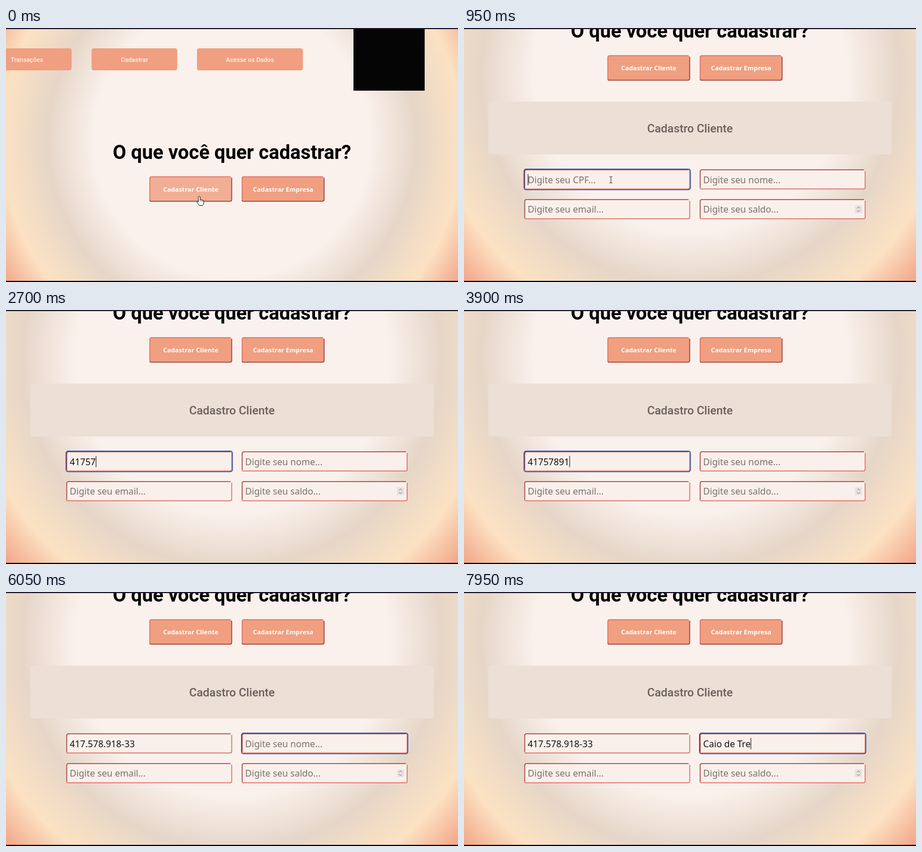
An HTML page that plays this animation: 800x450 px, repeating every 8000 ms.

```html
<!DOCTYPE html>
<html lang="pt-BR">
<head>
<meta charset="utf-8">
<title>Cadastro</title>
<style>
  html, body { margin: 0; width: 100%; height: 100%; overflow: hidden; background: #000; }
  svg { display: block; width: 100vw; height: 100vh; }
  text { font-family: "Noto Sans", sans-serif; white-space: pre; }
  .title, .nav, .legend { font-family: Roboto, sans-serif; text-anchor: middle; }
  .title { font-size: 34.4px; font-weight: 600; }
  .nav { font-size: 11px; font-weight: 500; fill: #fdf1ea; }
  .legend { font-size: 20.4px; font-weight: 500; fill: #685f5c; }
  .button { font-size: 11.3px; font-weight: 700; fill: #fff; text-anchor: middle; }
  .field { font-size: 16.1px; }
</style>
</head>
<body>
<svg viewBox="0 0 800 450">
  <defs>
    <radialGradient id="glow" gradientUnits="userSpaceOnUse" cx="400">
      <stop offset=".5" stop-color="#faf1ec"/>
      <stop offset=".667" stop-color="#e6d6c8"/>
      <stop offset=".833" stop-color="#fce2c3"/>
      <stop offset="1" stop-color="#f09a7d"/>
    </radialGradient>
  </defs>
  <rect width="800" height="450" fill="url(#glow)"/>
  <g id="page"></g>
  <g id="hand" fill="#fff" stroke="#222" stroke-width="1" stroke-linejoin="round">
    <path d="M-1.5 1Q0-1 1.5 1V6Q3 5 4 6.5Q5.5 6 6 7.5Q8 7 8 9V12Q8 14 6 16.5H0Q-2 13-4.5 10Q-4.5 8-1.5 10Z"/>
    <path d="M1.5 6V9M4 6.5V9M6 7.5V10" fill="none" stroke-width=".7"/>
  </g>
  <path id="beam" d="M-2.5-5.5H-.7L0-5L.7-5.5H2.5M0-5V5M-2.5 5.5H-.7L0 5L.7 5.5H2.5" fill="none" stroke="#333"/>
  <rect width="800" height="2" fill="#211d2c"/>
  <rect y="448" width="800" height="2" fill="#000"/>
</svg>
<script>
const LOOP = 8000, SCROLL = 214.5, FORM_AT = 150, SCROLL_END = 533;
const CPF_FOCUS = 850, NAME_FOCUS = 5500;
const DARK = '#a34440', LIGHT = '#de6b62';
const $ = id => document.getElementById(id);

const label = (cls, x, y, str) => `<text class="${cls}" x="${x}" y="${y}">${str}</text>`;

// Rounded box with differently coloured top-left and bottom-right edges.
const bevel = (x, y, w, h, fill, topLeft, bottomRight, id = '') => `
  <rect id="${id}" x="${x}" y="${y}" width="${w}" height="${h}" rx="3" fill="${fill}"/>
  <g fill="none" stroke-width="1.5">
    <path stroke="${topLeft}" d="M${x} ${y + h - 2}V${y + 3}q0-3 3-3H${x + w - 2}"/>
    <path stroke="${bottomRight}" d="M${x} ${y + h - 2}q0 2 2 2H${x + w - 3}q3 0 3-3V${y + 2}"/>
  </g>`;

const navButton = (x, w, str) =>
  `<rect x="${x}" y="-178.5" width="${w}" height="39" rx="4" fill="#f09f80"/>` +
  label('nav', x + w / 2, -154.5, str);

const button = (x, str, id) =>
  bevel(x, 49, 145, 43.5, '#f09f80', LIGHT, '#963f38', id) + label('button', x + 72.5, 75.3, str);

const field = (id, x, y, hint) => `
  <rect id="${id}Ring" x="${x - 1}" y="${y - 1}" width="294" height="36" rx="3.5"
        fill="none" stroke="#2152b5" stroke-width="2"/>` +
  bevel(x, y, 292, 34, '#faf0eb', DARK, LIGHT) +
  `<text id="${id}" class="field" x="${x + 5.3}" y="${y + 23.4}" fill="#78706d">${hint}</text>`;

$('page').innerHTML =
  navButton(-42, 158, 'Transações') + navButton(151.5, 151.5, 'Cadastrar') +
  navButton(338, 187.5, 'Acesse os Dados') +
  '<rect x="615" y="-229.5" width="126" height="126" fill="#050505"/>' +
  label('title', 400, 17.3, 'O que você quer cadastrar?') +
  button(254.5, 'Cadastrar Cliente', 'client') + button(418, 'Cadastrar Empresa', 'company') +
  `<g id="form">
    <rect x="43" y="130.5" width="714" height="93.5" rx="4" fill="#ecdfd5"/>` +
    label('legend', 400, 185, 'Cadastro Cliente') +
    field('cpf', 107.5, 251.3, 'Digite seu CPF...') + field('name', 418, 251.3, 'Digite seu nome...') +
    field('email', 107.5, 304, 'Digite seu email...') + field('balance', 418, 304, 'Digite seu saldo...') +
    `<rect x="692" y="314" width="12.5" height="14" fill="#e7e3e2"/>
    <path d="M695.5 319.5l2.7-2.7 2.7 2.7M695.5 322.8l2.7 2.7 2.7-2.7" fill="none" stroke="#777"/>
    <rect id="caret" y="258.5" width="1" height="20" fill="#111"/>
  </g>`;

const clamp = v => Math.max(0, Math.min(1, v));
const ease = p => p < .5 ? 4 * p ** 3 : 1 - 4 * (1 - p) ** 3;
const progress = (t, from, to) => ease(clamp((t - from) / (to - from)));
const show = (id, on) => $(id).setAttribute('visibility', on ? 'inherit' : 'hidden');

const evenly = (count, from, to) =>
  Array.from({ length: count }, (_, i) => from + (to - from) * i / (count - 1));
const cpfKeys = [1000, 1200, ...evenly(6, 1920, 3770), ...evenly(3, 4050, 4650)];
const nameKeys = evenly(11, 6300, 7850);

function typed(t, str, keys) {
  return str.slice(0, keys.filter(k => k <= t).length);
}

function fill(id, value, hint) {
  $(id).textContent = value || hint;
  $(id).setAttribute('fill', value ? '#111' : '#78706d');
}

function render(t) {
  const open = t >= FORM_AT;
  const offset = SCROLL * (1 - progress(t, FORM_AT, SCROLL_END));
  $('page').setAttribute('transform', `translate(0 ${offset})`);
  $('glow').setAttribute('cy', open ? 85 + offset : 198);
  $('glow').setAttribute('r', open ? 555 : 489);
  show('form', open);
  $('client').setAttribute('fill', t < 220 ? '#f2ae94' : '#f09f80');

  const first = progress(t, 150, 450), second = progress(t, 520, 820);
  const place = `translate(${342 + 61 * first - 143 * second} ${298 - 90 * first + 61 * second})`;
  $('hand').setAttribute('transform', place);
  $('beam').setAttribute('transform', place);
  show('hand', t < 250);
  show('beam', t >= 250 && t < cpfKeys[0]);

  const onCpf = t >= CPF_FOCUS && t < NAME_FOCUS, onName = t >= NAME_FOCUS;
  for (const id of ['cpf', 'name', 'email', 'balance'])
    show(id + 'Ring', id === 'cpf' && onCpf || id === 'name' && onName);
  const cpf = onName ? '417.578.918-33' : typed(t, '41757891833', cpfKeys);
  const name = typed(t, 'Caio de Tre', nameKeys);
  fill('cpf', cpf, 'Digite seu CPF...');
  fill('name', name, 'Digite seu nome...');

  // The caret restarts its blink at each key press.
  const lastInput = Math.max(...[CPF_FOCUS, NAME_FOCUS, ...cpfKeys, ...nameKeys].filter(k => k <= t));
  show('caret', (onCpf || onName) && (t - lastInput) % 1000 < 500);
  const active = onName ? 'name' : 'cpf', value = onName ? name : cpf;
  const width = value ? $(active).getComputedTextLength() : 0;
  $('caret').setAttribute('x', +$(active).getAttribute('x') + width);
}

const start = performance.now();
function tick() {
  render((performance.now() - start) % LOOP);
  requestAnimationFrame(tick);
}
tick();
</script>
</body>
</html>
```
